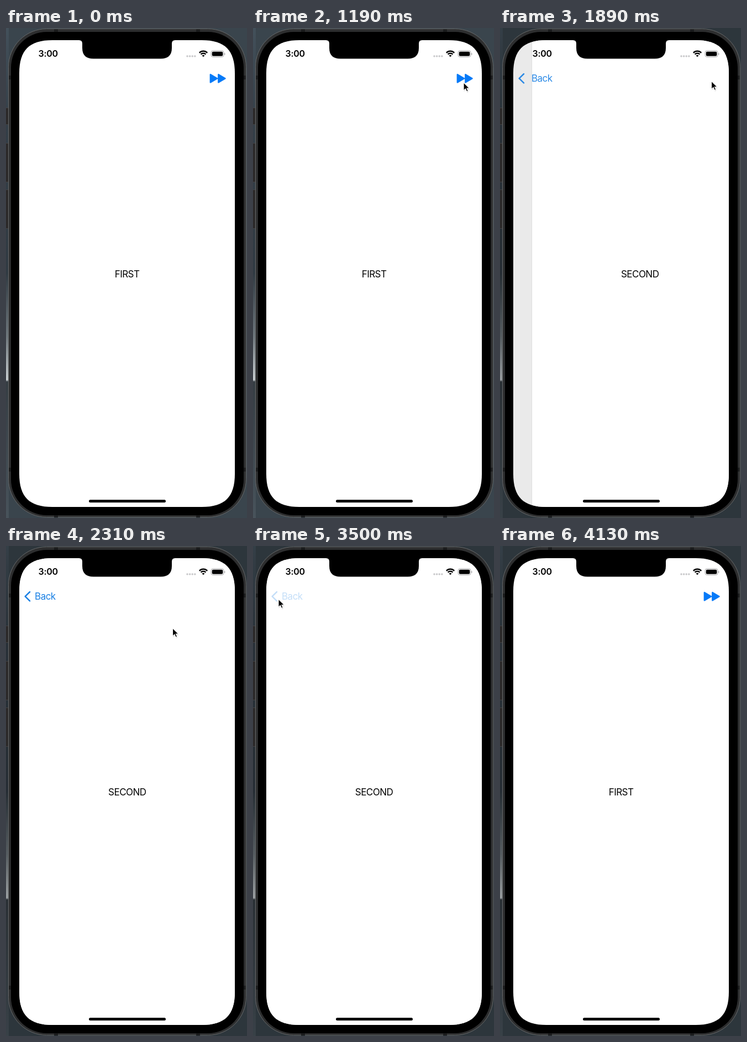
An HTML page that plays this animation: 436 by 886 pixels, repeating every 4690 ms.

```html
<!DOCTYPE html>
<html lang="en">
<head>
<meta charset="utf-8">
<title>Push and pop</title>
<style>
html, body { margin: 0; width: 100%; height: 100%; overflow: hidden; background: #333d45; }
svg { display: block; width: 436px; height: 886px; }
text { font: 17px Inter, "Liberation Sans", sans-serif; letter-spacing: -.52px; }
.mid { text-anchor: middle; }
.time { font-size: 16px; font-weight: 600; letter-spacing: -.3px; }
.back { fill: #1a80e4; }
</style>
</head>
<body>
<svg viewBox="0 0 436 886">
  <defs>
    <clipPath id="screen"><path d="M24 82C24 40 42 22 84 22H354C396 22 414 40 414 82V806C414 848 396 866 354 866H84C42 866 24 848 24 806Z"/></clipPath>
    <linearGradient id="wall" x2="0" y2="1">
      <stop offset="0" stop-color="#43505a"/>
      <stop offset=".2" stop-color="#333e47"/>
      <stop offset=".5" stop-color="#303a42"/>
      <stop offset=".63" stop-color="#6d767b"/>
      <stop offset=".718" stop-color="#c3c9cc"/>
      <stop offset=".722" stop-color="#353d43"/>
      <stop offset="1" stop-color="#48535b"/>
    </linearGradient>
  </defs>

  <!-- backdrop and phone body -->
  <rect width="436" height="886" fill="#3a454d"/>
  <rect width="5" height="886" fill="url(#wall)"/>
  <rect id="shade" width="436" height="886" opacity="0"/>
  <g fill="#2b2929" stroke="#4a4847" stroke-width=".8">
    <rect x="-3" y="144.5" width="9" height="30"/>
    <rect x="-3" y="208.5" width="9" height="70"/>
    <rect x="-3" y="292.5" width="9" height="70"/>
  </g>
  <rect x="4.5" y="1.5" width="430" height="883" rx="69" fill="#2d2e2f" stroke="#67696a"/>
  <path d="M87 2h7v6h-7zM344 2h7v6h-7zM87 880h7v5h-7zM344 880h7v5h-7zM5 86h5v7h-5zM429 86h5v7h-5zM5 795h5v7h-5zM429 795h5v7h-5z" fill="#1b1c1d"/>
  <rect x="9" y="7" width="421" height="874" rx="65"/>

  <g clip-path="url(#screen)">
    <rect x="24" y="22" width="390" height="844" fill="#fff"/>
    <text id="first" class="mid" x="219" y="450.6">FIRST</text>
    <rect id="dim" x="24" y="22" width="390" height="844" opacity="0"/>
    <g id="second">
      <rect x="23" y="22" width="1" height="844" opacity=".06"/>
      <rect x="24" y="22" width="390" height="844" fill="#fff"/>
      <text class="mid" x="219" y="450.6">SECOND</text>
    </g>

    <!-- navigation bar -->
    <g id="back" class="back">
      <path d="M43 83L34.7 91.2L43 99.4" fill="none" stroke="#1a80e4" stroke-width="2.5" stroke-linecap="round" stroke-linejoin="round"/>
      <text id="label" x="52" y="97">Back</text>
    </g>
    <path id="skip" d="M369.8 84v14.4l12.2-7.2zM384.3 84v14.4l12.2-7.2z" fill="#067af8" stroke="#067af8" stroke-width="2.4" stroke-linejoin="round"/>

    <!-- status bar -->
    <text class="time" x="58.5" y="52.3">3:00</text>
    <g fill="#c9c9cb">
      <circle cx="328" cy="51" r="1.8"/><circle cx="332.6" cy="51" r="1.8"/>
      <circle cx="337.2" cy="51" r="1.8"/><circle cx="341.8" cy="51" r="1.8"/>
    </g>
    <path d="M349.8 44.8a10.2 10.2 0 0 1 14.4 0M352.6 47.6a6.2 6.2 0 0 1 8.8 0" fill="none" stroke="#000" stroke-width="2.5"/>
    <path d="M357 52.3l-2.4-2.4a3.4 3.4 0 0 1 4.8 0z"/>
    <rect x="371" y="41" width="23" height="11.5" rx="3.6" fill="none" stroke="#a9a9ab"/>
    <rect x="372.7" y="42.7" width="19.6" height="8.1" rx="2.1"/>
    <path d="M395.2 45v4q1.4-.6 1.4-2t-1.4-2" fill="#a9a9ab"/>
    <rect x="150" y="853" width="139" height="5" rx="2.5"/>
  </g>
  <path d="M132 21V22Q138 22 138 28V36Q138 55.5 158 55.5H280Q300 55.5 300 36V28Q300 22 306 22V21Z"/>

  <g id="cursor">
    <path d="M1 2v15l3.5-3 2.3 5 2.6-1.2-2.2-4.7h4.6z" opacity=".13"/>
    <path d="M.5.5v14.6l3.4-3.1 2.3 5 2.5-1.1-2.2-4.8h4.6z" stroke="#fff" stroke-width="1.1"/>
  </g>
</svg>
<script>
const LOOP = 4690, STEP = 70;
const PRESS_SKIP = 1400, PUSH = 1578, PRESS_BACK = 3290, POP = 3499;
const el = id => document.getElementById(id);
const shift = (id, x, y = 0) => el(id).setAttribute('transform', `translate(${x} ${y})`);
const fade = (id, a) => el(id).setAttribute('opacity', a);

// critically damped spring: the part of the way still left
const left = ms => {
  const k = Math.max(0, ms) * .013;
  return (1 + k) * Math.exp(-k);
};

const linear = u => u;
const speedUp = u => u * u;
const slowDown = p => u => 1 - (1 - u) ** p;

// time, x, y, easing on the way there
const path = [
  [140, 242, 788, linear],
  [630, 370, 195, slowDown(1.5)],
  [1190, 380.5, 98, slowDown(2)],
  [1400, 380.5, 98, linear],
  [1890, 382, 95.5, linear],
  [2310, 301, 148, speedUp],
  [2450, 179.5, 137, linear],
  [2940, 45, 96, slowDown(2)],
  [3080, 45, 96, linear],
  [3150, 45.5, 95.5, linear],
  [3780, 45.5, 95.5, linear]
];

function moveCursor(t) {
  const i = path.findIndex(k => k[0] > t);
  fade('cursor', i > 0 ? 1 : 0);
  if (i < 1) return;
  const [t0, x0, y0] = path[i - 1], [t1, x1, y1, ease] = path[i];
  const u = ease((t - t0) / (t1 - t0));
  shift('cursor', x0 + (x1 - x0) * u, y0 + (y1 - y0) * u);
}

function draw(t) {
  const popping = t >= POP;
  let shown = popping ? left(t - POP) : 1 - left(t - PUSH);
  if (popping && shown < .003) shown = 0;
  const away = 1 - shown;

  shift('first', -117 * shown);
  shift('second', 390 * away);
  fade('second', shown > .006 ? 1 : 0);
  fade('dim', .092 * shown);
  shift('label', away * (popping ? 38 : 57));
  fade('back', shown * (t >= PRESS_BACK ? .25 : 1));
  fade('skip', away ** 2 * (t >= PRESS_SKIP && !popping ? .25 : 1));
  fade('shade', t >= PRESS_SKIP ? .22 : 0);
  moveCursor(t);
}

const start = performance.now();
function tick() {
  const t = (performance.now() - start) % LOOP;
  draw(Math.floor(t / STEP) * STEP);
  requestAnimationFrame(tick);
}
tick();
</script>
</body>
</html>
```
